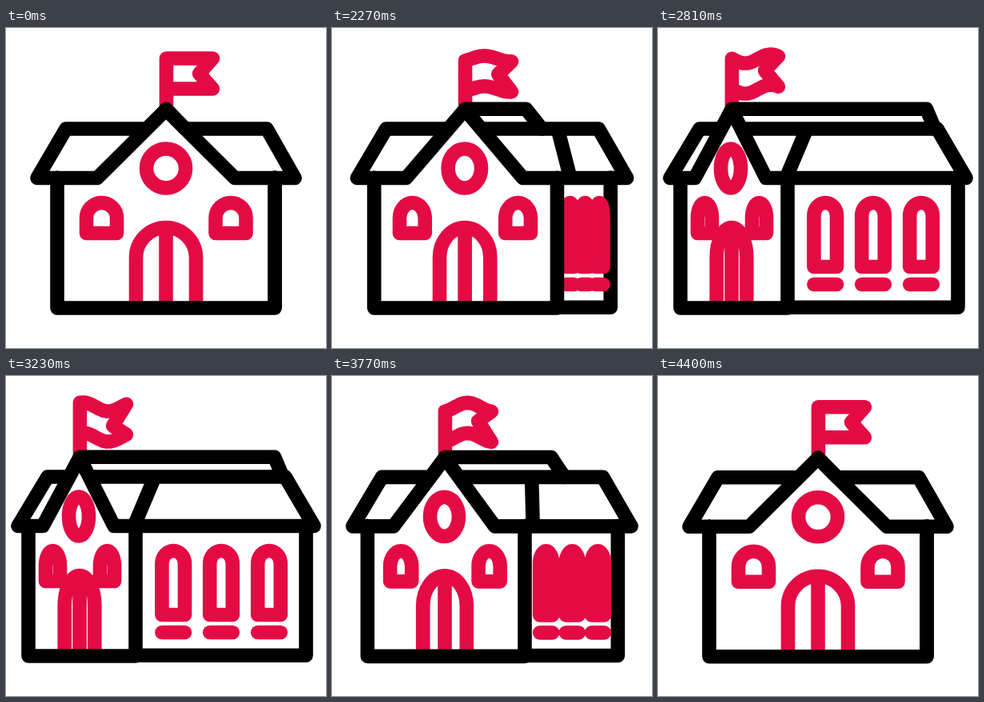
Recreate the animation shown at these times as an HTML page. Size 400 by 400 pixels, loop 4.43 s.

```html
<!DOCTYPE html>
<html lang="en">
<head>
<meta charset="utf-8">
<title>Turning schoolhouse</title>
<style>
  html, body { margin: 0; width: 100%; height: 100%; overflow: hidden; background: #fff; }
  svg { display: block; width: 100%; height: 100%; }
  path { fill: none; stroke-width: 17.6; stroke-linecap: round; stroke-linejoin: round; }
  .red { stroke: #e40b45; }
  .black { stroke: #000; }
  #front { stroke-linecap: butt; }
</style>
</head>
<body>
<svg viewBox="0 0 400 400">
  <g id="house">
    <path id="flag" class="red"/>
    <path id="front" class="red"/>
    <path id="back" class="black"/>
    <path id="side" class="red"/>
    <path id="frame" class="black"/>
  </g>
</svg>
<script>
const LOOP = 4430, MOVE = 2030, STEP = 30;
const el = id => document.getElementById(id);
const [house, flag, front, back, side, frame] =
  ['house', 'flag', 'front', 'back', 'side', 'frame'].map(el);

const ramp = (t, a, b) => {
  const x = Math.min(1, Math.max(0, (t - a) / (b - a)));
  return x * x * (3 - 2 * x);
};
const line = (...pts) => 'M' + pts.map(q => q.map(v => v.toFixed(2)).join(' ')).join('L');

// Arched window: centre, half width, arch height, top and bottom
const arch = (x, w, h, top, bottom) =>
  `M${x - w} ${bottom}V${top + h}A${w} ${h} 0 0 1 ${x + w} ${top + h}V${bottom}Z`;

const oval = (x, y, rx, ry) =>
  `M${x - rx} ${y}a${rx} ${ry} 0 0 1 ${2 * rx} 0a${rx} ${ry} 0 0 1 ${-2 * rx} 0Z`;

function flagPath(x, t) {
  const amp = 5.6 * ramp(t, 2010, 2450) * (1 - ramp(t, 3900, 4390));
  const phase = -0.28 - 0.00445 * (t - 3920);
  const at = (u, y) => [x + 58 * u, y + amp * (Math.cos(5.7 * u + phase) + 0.1)];
  const top = [], low = [];
  for (let i = 0; i <= 12; i++) {
    top.push(at(i / 12, 38));
    low.unshift(at(i / 12, 76));
  }
  return line([x, 96], ...top, at(0.71, 57), ...low);
}

function draw(t) {
  // Share of the turn from the front view to the side view
  const p = ramp(t, 2010, 2707) - ramp(t, 3390, 4200);
  const mix = (a, b) => a + (b - a) * p;

  const left = mix(64, 28), edge = mix(336, 162), right = mix(336, 375);
  const apex = mix(200, 92), door = mix(37.5, 18.8);
  const eaveL = mix(39, 15), eaveR = mix(361, 385);
  const roofR = mix(326, 349);

  house.setAttribute('transform', `translate(0 ${0.8 * ramp(t, 3390, 4200)})`);
  flag.setAttribute('d', flagPath(apex + 0.4, t));

  const pane = mix(19, 9);
  front.setAttribute('d',
    oval(mix(200, 91), 175.5, mix(24.5, 12.5), 24.5) +
    arch(mix(119.5, 58.5), pane, 19, 218.5, 256.5) +
    arch(mix(281, 126.5), pane, 19, 218.5, 256.5) +
    `M${apex - door} 346V287A${door} 37.5 0 0 1 ${apex + door} 287V346M${apex} 250V346`);

  back.setAttribute('d',
    line([edge, 349.2], [right, 349.2], [right, 187]) +
    line([apex, 101.2], [mix(200, 335.5), 101.2], [mix(224, 346), 126]));

  const w = mix(0.5, 14.3);
  side.setAttribute('d', p < 0.001 ? '' : [[338, 209.2], [338, 269], [336.5, 329]]
    .map(([a, b]) => {
      const x = mix(a, b);
      return arch(x, w, 16, 218.5, 298.5) + line([x - w, 320.5], [x + w, 320.5]);
    }).join(''));

  frame.setAttribute('d',
    line([left, 187], [left, 350], [edge, 350], [edge, 187]) +
    line([mix(172, 78), 126], [mix(75, 52), 126], [eaveL, 187.5], [mix(114, 46), 187.5],
      [apex, 102], [mix(286, 135), 187.5], [eaveR, 187.5], [roofR, 126], [mix(228, 106), 126]) +
    line([mix(326, 186), 126], [mix(361, 160), 187.5]));
}

const begin = performance.now();
function tick() {
  const t = (performance.now() - begin) % LOOP;
  draw(t < MOVE ? 0 : MOVE + Math.floor((t - MOVE) / STEP) * STEP);
  requestAnimationFrame(tick);
}
tick();
</script>
</body>
</html>
```
